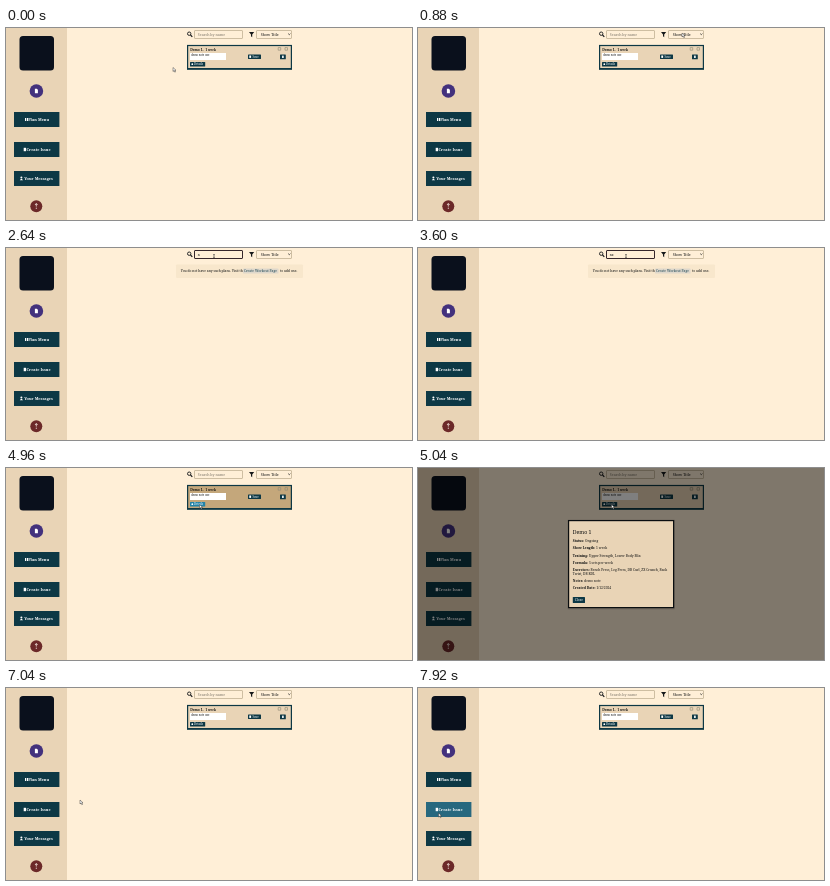
These frames come from a looping animation (406x192 px, 8 s). An HTML page:

```html
<!DOCTYPE html>
<html lang="en">
<head>
<meta charset="utf-8">
<title>Plan list</title>
<style>
  html, body { margin: 0; width: 100%; height: 100%; overflow: hidden; background: #ffefd7; }
  svg { display: block; width: 406px; height: 192px; font-family: "Noto Serif", "Liberation Serif", serif; }
  text { font-size: 3.3px; font-weight: 500; fill: #0b0d0e; white-space: pre; }
  .panel { fill: #e9d4b6; }
  .dark { fill: #0d3845; }
  .light { fill: #fff; }
  .nav text { font-size: 3.9px; font-weight: 600; fill: #fff; }
  .field { fill: #ffefd7; stroke: #b9a98c; stroke-width: .7; }
  .field.focus { stroke: #35262b; stroke-width: 1; }
  .hint { fill: #7d766a; }
  .card.hover .body { fill: #c4a77b; }
  .button.hover > .dark { fill: #27687f; }
  .details.hover > .dark { fill: #2383a8; }
  .b { font-weight: 700; }
</style>
</head>
<body>
<svg viewBox="0 0 406 192">
  <rect width="406" height="192" fill="#ffefd7"/>
  <rect class="panel" width="61" height="192"/>
  <rect x="13.5" y="8" width="34.5" height="34.5" rx="3.5" fill="#0a101c"/>

  <circle cx="30.4" cy="63" r="6.8" fill="#43317d"/>
  <path d="M28.9 60.8h2l1 1v3.4h-3z" fill="#fff"/>
  <g id="nav" class="nav"></g>
  <circle cx="30.3" cy="178.3" r="6" fill="#6c2929"/>
  <path d="M30.3 175.6v3M29 177l1.3-1.5 1.3 1.5M30.3 179.6v1.4" stroke="#f3e4dc" stroke-width=".8" fill="none"/>

  <g fill="none" stroke="#15181a">
    <circle cx="183.2" cy="5.7" r="1.7" stroke-width=".9"/>
    <path d="M184.5 7l1.8 1.9" stroke-width="1.1"/>
  </g>
  <rect id="search" class="field" x="188.5" y="2.5" width="48" height="8" rx=".5"/>
  <text id="query" x="191.8" y="7.5" style="font-size:3.6px"></text>
  <path d="M243 4h5.2l-2 2.5v2.7l-1.2-.9V6.5z" fill="#15181a"/>
  <rect class="field" x="250.5" y="2.5" width="35" height="8" rx=".5"/>
  <text x="254.8" y="7.5" style="font-size:3.6px">Show Title</text>
  <path d="M282.2 5.6l1.1 1.1 1.1-1.1" fill="none" stroke="#15181a" stroke-width=".7"/>

  <g id="card" class="card">
    <rect class="body panel" x="181.6" y="17.5" width="103.8" height="23.5"/>
    <rect x="181.6" y="17.5" width="103.8" height="23.5" fill="none" stroke="#0d3845" stroke-width="1.2"/>
    <rect x="181" y="40" width="105" height="1.6" class="dark"/>
    <text class="b" x="184.2" y="22.7">Demo 1</text>
    <text class="b" x="196.4" y="22.7">-</text>
    <text class="b" x="199.6" y="22.7" style="font-size:3px">1 week</text>
    <path d="M272.2 19.6h2.5v2.6h-2.5zM279 19.6h2.5v2.6H279z" fill="none" stroke="#8d8a76" stroke-width=".6"/>
    <rect x="184" y="25" width="36" height="7" fill="#fff"/>
    <text x="185.2" y="28.2" style="font-size:2.6px">demo note one</text>
    <rect class="dark" x="242" y="26.5" width="13" height="4.6" rx=".5"/>
    <rect class="light" x="243.3" y="27.5" width="1.8" height="2.4"/>
    <text class="light" x="246.4" y="30" style="font-size:2.9px">Save</text>
    <rect class="dark" x="274" y="26.4" width="5.8" height="4.9" rx=".5"/>
    <rect class="light" x="276.1" y="27.6" width="1.6" height="2.4"/>
    <g id="details" class="details">
      <rect class="dark" x="184" y="34" width="15.2" height="4.4" rx=".5"/>
      <circle class="light" cx="186.3" cy="36.2" r=".9"/>
      <text class="light" x="188" y="37.2" style="font-size:2.8px">Details</text>
    </g>
  </g>

  <g id="empty">
    <rect x="170" y="16.5" width="127" height="13.5" rx="1" fill="#f8e7cc"/>
    <text x="174.8" y="24.2">You do not have any such plans. Visit the</text>
    <rect x="237" y="20.6" width="35.5" height="4.9" rx=".6" fill="#dfd8cc"/>
    <text x="238" y="24.2" style="fill:#174252">Create Workout Page</text>
    <text x="274" y="24.2">to add one.</text>
  </g>

  <g id="menu">
    <rect x="250.3" y="10.8" width="35.2" height="13" fill="#fff3df" stroke="#77716a" stroke-width=".6"/>
    <rect x="250.5" y="10.9" width="34.8" height="3.8" fill="#1967c5"/>
    <text x="254.6" y="13.9" style="fill:#fff">Show Title</text>
    <text x="254.6" y="18">Newest First</text>
    <text x="254.6" y="22.1">Completed Set</text>
  </g>

  <g id="modal">
    <rect width="406" height="192" opacity=".5"/>
    <rect x="149.5" y="51.5" width="107.5" height="90" rx="1" opacity=".12"/>
    <rect class="panel" x="150.6" y="52.6" width="105" height="87" stroke="#0b0e10" stroke-width="1.2"/>
    <text x="154.8" y="65.9" style="font-size:5.2px">Demo 1</text>
    <g id="facts"></g>
    <rect class="dark" x="154.8" y="129" width="12.2" height="6" rx=".5"/>
    <text class="light" x="160.9" y="133.2" text-anchor="middle">Close</text>
  </g>

  <g id="cursor">
    <path id="arrow" d="M0 0v4l1-.9.8 1.6.7-.3-.8-1.6h1.3z" fill="#fff" stroke="#111" stroke-width=".4"/>
    <path id="beam" d="M-.7 0H.7M0 0v3M-.7 3H.7" fill="none" stroke="#222" stroke-width=".6"/>
  </g>
</svg>
<script>
const LOOP = 8000, STEP = 80;
const $ = id => document.getElementById(id);

$("nav").innerHTML = [["Plan Menu", 84], ["Create Issue", 114], ["Your Messages", 143]].map(([label, y], i) => {
  const half = [10, 11.5, 15][i];
  const icon = [
    `<path d="M${29 - half} ${y + 6}h1.2v3h-1.2zm1.9 0h1.2v3h-1.2z" fill="#fff"/>`,
    `<path d="M${29.2 - half} ${y + 5.8}h2.4v3.4h-2.4z" fill="#fff"/>`,
    `<path d="M${28.8 - half} ${y + 9.2}q1.6-3 3.2 0z" fill="#fff"/><circle cx="${30.4 - half}" cy="${y + 6.4}" r="1" fill="#fff"/>`
  ][i];
  return `<g id="nav${i}" class="button"><rect class="dark" x="8" y="${y}" width="45.4" height="15"/>${icon}
    <text x="32.6" y="${y + 9}" text-anchor="middle">${label}</text></g>`;
}).join("");

$("facts").innerHTML = [
  [74.3, "Status:", "Ongoing"],
  [81.4, "Show Length:", "1 week"],
  [88.5, "Training:", "Upper Strength, Lower Body Mix"],
  [95.9, "Formula:", "5 sets per week"],
  [102.7, "Exercises:", "Bench Press, Leg Press, DB Curl, ZX Crunch, Back"],
  [106.9, "", "Twist, DB RDL"],
  [114.1, "Notes:", "demo note"],
  [121.2, "Created Date:", "1/12/2024"]
].map(([y, name, value]) =>
  `<text x="154.8" y="${y}"><tspan class="b">${name}</tspan>${name && " "}${value}</text>`).join("");

// Pointer path: time, x, y
const path = [
  [0, 167, 39.5], [160, 167, 39.5], [880, 264, 5], [1120, 264, 5], [1360, 262, 12],
  [1760, 227, 2], [1920, 226, 3], [2240, 208, 6.5], [4080, 208, 6.5],
  [4400, 222, 46], [4560, 220, 46], [4880, 193.5, 36.5], [5120, 193.5, 36.5],
  [5360, 222, 66], [5840, 299, 83], [6160, 299, 83], [6800, 74, 112],
  [7520, 74, 112], [7840, 20.5, 125], [8000, 20.5, 125]
];
const typed = [[0, ""], [2480, "x"], [2880, "xz"], [3760, "x"], [3920, ""]];

function pointer(t) {
  const i = path.findIndex(p => p[0] > t);
  const [t0, x0, y0] = path[i - 1], [t1, x1, y1] = path[i];
  const k = (t - t0) / (t1 - t0), e = k * k * (3 - 2 * k);
  return [x0 + (x1 - x0) * e, y0 + (y1 - y0) * e];
}

const show = (id, on) => $(id).style.display = on ? "" : "none";

function draw(t) {
  const [x, y] = pointer(t);
  const during = (a, b) => t >= a && t < b;
  const over = (l, top, r, b) => x >= l && x <= r && y >= top && y <= b;
  const query = typed.filter(s => s[0] <= t).pop()[1];
  const modal = during(5040, 6000), menu = during(1040, 1920);
  const hover = (id, ...box) => $(id).classList.toggle("hover", !modal && !menu && over(...box));

  show("card", !query);
  show("empty", query);
  show("menu", menu);
  show("modal", modal);
  $("query").textContent = query || "Search by name";
  $("query").classList.toggle("hint", !query);
  $("search").classList.toggle("focus", during(2320, 4480));

  hover("card", 181, 17, 286, 41.6);
  hover("details", 184, 34, 199.2, 38.4);
  hover("nav1", 8, 114, 53.4, 129);

  const beam = over(188.5, 1.5, 236.5, 10.5);
  show("beam", beam);
  show("arrow", !beam);
  $("cursor").setAttribute("transform", `translate(${x} ${y})`);
}

const start = performance.now();
function tick() {
  const t = (performance.now() - start) % LOOP;
  draw(Math.floor(t / STEP) * STEP);
  requestAnimationFrame(tick);
}
tick();
</script>
</body>
</html>
```
